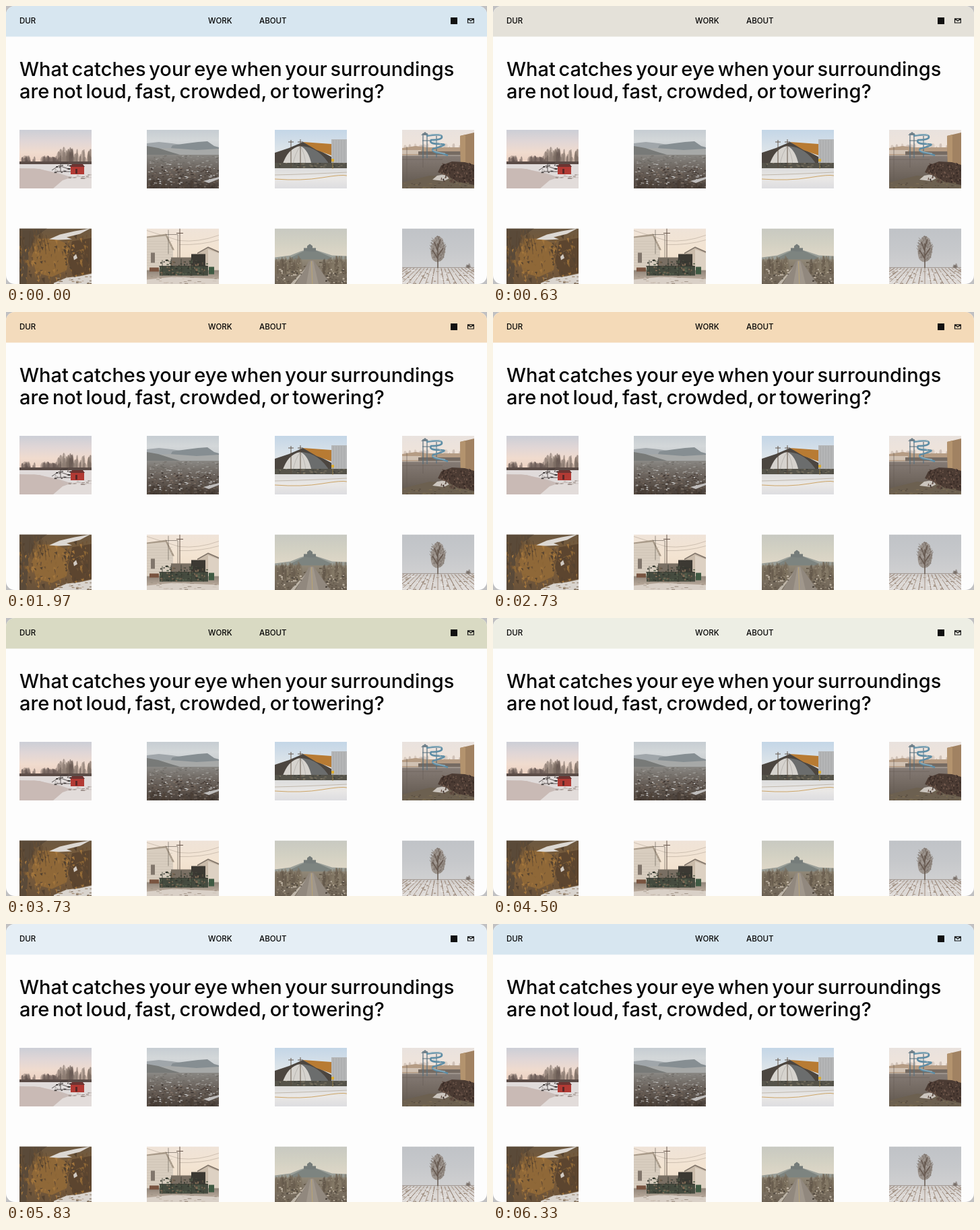
These frames come from a looping animation (714 by 413 pixels, 6360 ms). An HTML page:

```html
<!DOCTYPE html>
<html lang="en">
<head>
<meta charset="utf-8">
<title>Portfolio</title>
<style>
  html, body { margin: 0; width: 100%; height: 100%; overflow: hidden; background: #c0c0c2; }
  #stage { display: block; width: 714px; height: 413px; }
  text { font-family: Inter, "Open Sans", sans-serif; font-weight: 500; fill: #050505; }
  .nav { font-size: 11.5px; }
  .title { font-size: 29px; word-spacing: -3px; }
</style>
</head>
<body>
<svg id="stage" viewBox="0 0 714 413">
  <defs>
    <clipPath id="card"><rect width="714" height="413" rx="13"/></clipPath>
    <clipPath id="frame"><rect width="107" height="87"/></clipPath>
  </defs>
  <g clip-path="url(#card)">
    <rect width="714" height="413" fill="#fdfdfd"/>
    <rect id="bar" width="714" height="45.5" fill="#d7e6f0"/>
    <g class="nav">
      <text x="20" y="26">DUR</text>
      <text x="300" y="26">WORK</text>
      <text x="376" y="26">ABOUT</text>
    </g>
    <rect x="660" y="17" width="10" height="10" fill="#111"/>
    <path d="M685.5 18.8h8.8v6.2h-8.8zl4.4 3.4 4.4-3.4" fill="none" stroke="#111" stroke-width="1.2"/>
    <g class="title">
      <text x="20" y="103.5">What catches your eye when your surroundings</text>
      <text x="20" y="136.5">are not loud, fast, crowded, or towering?</text>
    </g>
    <g id="photos"></g>
  </g>
</svg>
<script>
const LOOP = 6360;
const NS = 'http://www.w3.org/2000/svg';

function add(parent, tag, attrs) {
  const el = document.createElementNS(NS, tag);
  for (const key in attrs) el.setAttribute(key, attrs[key]);
  return parent.appendChild(el);
}

function seeded(seed) {
  return () => {
    seed = (seed * 1664525 + 1013904223) >>> 0;
    return seed / 4294967296;
  };
}

// Drawing helpers for one 107 x 87 picture.
function pen(g, id) {
  const rnd = seeded(id * 977 + 13);
  const span = (a, b) => a + (b - a) * rnd();
  const pick = list => list[Math.floor(rnd() * list.length)];
  const shape = (fill, d) => add(g, 'path', { d, fill });
  const line = (stroke, width, d) => add(g, 'path', { d, stroke, 'stroke-width': width, fill: 'none' });
  const box = (fill, x, y, width, height) => add(g, 'rect', { x, y, width, height, fill });
  const fade = (colors, y, h) => {
    const name = `fade${id}-${y}`;
    const grad = add(g, 'linearGradient', { id: name, x1: 0, y1: 0, x2: 0, y2: 1 });
    colors.forEach((c, i) => add(grad, 'stop', { offset: i / (colors.length - 1), 'stop-color': c }));
    box(`url(#${name})`, 0, y, 107, h);
  };
  const specks = (n, x0, y0, x1, y1, w, h, colors) => {
    for (let i = 0; i < n; i++)
      box(pick(colors), span(x0, x1), span(y0, y1), span(w * .4, w), span(h * .4, h));
  };
  // Soft bare trees: translucent crowns standing on a base line.
  const trees = (n, x0, x1, base, low, high, colors) => {
    for (let i = 0; i < n; i++) {
      const x = span(x0, x1), tall = span(low, high);
      add(g, 'ellipse', { cx: x, cy: base - tall / 2, rx: span(1.5, 4), ry: tall / 2, fill: pick(colors), opacity: .4 });
      line(pick(colors), .5, `M${x} ${base}l${span(-1, 1)} ${-tall}`);
    }
  };
  return { span, shape, line, box, fade, specks, trees };
}

function river(p) {
  p.fade(['#ccced6', '#e0d6d6', '#f0dbce', '#ecd0c0'], 0, 50);
  p.fade(['#d6cbc8', '#c9bcb8', '#c2b5b1'], 49, 38);
  p.trees(34, 0, 60, 51, 6, 13, ['#6a5a55', '#7f6f68', '#574946']);
  p.trees(38, 58, 107, 53, 12, 28, ['#7b6b62', '#8d7d73', '#5f524c']);
  p.box('#5b4c47', 0, 47, 107, 4);
  p.shape('#e0dbda', 'M0 51H107V87H66L84 73L58 64L22 57L0 58z');
  p.shape('#c9bab5', 'M0 57L30 58L62 67L68 76L52 87H0z');
  p.shape('#e2dcda', 'M50 87L64 75L84 68H107V87z');
  p.specks(28, 50, 51, 76, 63, 4, 1.8, ['#2b2726', '#48423f', '#807773', '#e9e4e2']);
  p.line('#3a3433', .8, 'M48 60L59 53L75 59M61 62V50L72 49M52 62H77');
  p.box('#b23a34', 76, 55, 20, 11);
  p.shape('#6d3431', 'M75 55L78 51H94L97 55z');
  p.box('#5b2726', 83, 58, 3, 7);
  p.specks(20, 70, 66, 107, 72, 7, 1, ['#8e7f79', '#bbb1ad']);
}

function valley(p) {
  p.fade(['#c6cdd2', '#d3d7d9', '#c9cdcf'], 0, 30);
  p.shape('#a0a6aa', 'M0 20L18 18L37 20L57 23V38H0z');
  p.shape('#868e92', 'M38 23L60 20L76 18L90 17L100 24L107 26V38H30z');
  p.shape('#a7a9a8', 'M0 29L35 27L74 30L107 28V44H0z');
  p.shape('#787a78', 'M0 24L17 27L39 34L56 39L0 46z');
  p.fade(['#8a8884', '#716a64', '#5d544d', '#4a413b'], 37, 50);
  p.specks(130, 0, 38, 107, 56, 4, 1.2, ['#918e89', '#67645f', '#aaa8a4', '#79746e']);
  p.specks(200, 0, 54, 107, 87, 4, 2, ['#4b413b', '#665a50', '#3b332e', '#7e7065']);
  p.specks(60, 0, 50, 105, 82, 4, 1.4, ['#d3d4d4', '#b9b8b6']);
  p.shape('#c0bebd', 'M84 76L107 70V73L92 79z');
  p.trees(18, 0, 107, 87, 6, 14, ['#3b312a', '#51443a']);
}

function arena(p) {
  p.fade(['#c4d6e7', '#dbe3e9', '#f1e8df'], 0, 57);
  p.shape('#4c4640', 'M0 34L21 27L42 18L84 40V53H0z');
  p.shape('#b87b33', 'M42 18L84 21V38L62 30z');
  p.shape('#6b6d6d', 'M40 24Q66 26 82 53H45z');
  p.shape('#d6d3ce', 'M11 53Q19 27 38 24Q50 29 55 53z');
  p.line('#aeaba6', .7, 'M38 24Q45 36 46 53M38 24Q29 36 27 53');
  p.box('#b5b6b7', 84, 14, 23, 42);
  for (let x = 87; x < 107; x += 4) p.line('#a2a4a5', .7, `M${x} 15V55`);
  p.box('#55534a', 0, 49, 107, 8);
  p.specks(40, 0, 49, 105, 55, 4, 2, ['#6e695a', '#3d3f3a', '#837a67']);
  p.fade(['#dcdcdc', '#eae8e6', '#dddde0'], 57, 30);
  p.line('#c99c57', .9, 'M0 73Q40 76 70 71T107 68');
  p.line('#a89a88', .6, 'M0 67Q46 66 107 63');
  p.line('#5b4b3e', .9, 'M24 15V57M38 14V57M20 18H28M34 18H42');
  p.box('#dcae35', 84, 43, 4, 4);
  p.line('#a2884a', .8, 'M86 47V58');
}

function playground(p) {
  p.fade(['#e9e2de', '#f0e4da'], 0, 29);
  p.trees(14, 0, 86, 29, 4, 9, ['#b1a197', '#c6b5a8']);
  p.shape('#b59c84', 'M0 27L20 24L36 26H88V40H0z');
  p.box('#d0c1b2', 0, 30, 28, 6);
  p.box('#766b62', 24, 32, 63, 7);
  p.fade(['#857b75', '#736961', '#5f564d'], 38, 49);
  p.line('#c2b8af', .9, 'M0 38H87');
  p.line('#655d57', .6, 'M0 44H60M7 25V76M31 25V56');
  p.line('#58707e', 1.2, 'M31 5V42M37 5V42M51 9V41M30 16H44');
  p.shape('#70808a', 'M28 8L34 3L40 8z');
  p.line('#5e8da5', 2.6, 'M36 9Q58 5 59 10T43 15Q39 21 56 21T46 28Q42 33 60 35L68 38');
  p.line('#b0c8d1', .8, 'M38 8Q56 5 58 9M45 17Q57 18 57 22M45 30Q52 34 64 35');
  p.shape('#a18262', 'M86 9L107 4V58H87z');
  p.shape('#b3936e', 'M86 9L94 7V55H87z');
  p.shape('#6c6050', 'M0 78L41 68L107 72V87H0z');
  p.shape('#cbc5be', 'M45 74L52 68L63 66L70 72L62 76z');
  p.shape('#4b3b33', 'M53 63L58 53L74 47L93 48L107 52V82L82 77L66 68z');
  p.specks(130, 56, 49, 105, 77, 2.5, 3, ['#372a25', '#5b473d', '#6d564a']);
  p.specks(60, 0, 78, 107, 87, 5, 1.6, ['#7d6d54', '#574c3f', '#70634e']);
}

function cliff(p) {
  p.fade(['#6b5841', '#7b5c39', '#76593a', '#65503a'], 0, 87);
  p.shape('#5a4a39', 'M0 0H41L24 12L14 35L10 87H0z');
  p.shape('#8f6838', 'M27 15L53 15L76 25L70 62L48 72L25 66L18 42z');
  p.shape('#5c452f', 'M78 19L107 14V66L79 70L72 48z');
  const tones = ['#8c6636', '#544230', '#a3763d', '#6e5235'];
  for (let i = 0; i < 190; i++) {
    const x = p.span(-4, 104), y = p.span(8, 78);
    p.shape(tones[i % 4],
      `M${x} ${y}l${p.span(1, 5)} ${p.span(-2, 1)}l${p.span(-2, 1)} ${p.span(3, 9)}z`);
  }
  for (let i = 0; i < 30; i++)
    p.line(tones[i % 2 ? 1 : 3], .6, `M${p.span(0, 40)} ${p.span(0, 20)}l${p.span(-6, 6)} ${p.span(10, 26)}`);
  p.shape('#dcd8d3', 'M44 16L60 9L82 4L105 0L90 8L70 13L78 16L58 17z');
  p.shape('#d0cac3', 'M80 42L84 38L86 44L81 47z');
  p.shape('#d9d4ce', 'M51 81L70 73L89 71L107 67V87H50z');
  p.specks(30, 52, 71, 105, 83, 5, 1.6, ['#75624e', '#a99681']);
}

function yard(p) {
  p.fade(['#efe3d8', '#f3e4d2', '#eedcc7'], 0, 60);
  p.line('#a89a8c', .5, 'M48 18Q77 21 107 10M48 24Q80 25 107 17M0 3L48 18');
  p.shape('#d8cdbf', 'M0 14L29 10L39 32V65H0z');
  p.shape('#a89a89', 'M0 12L29 8L41 32H38L28 11L0 14z');
  for (let y = 19; y < 58; y += 4) p.line('#c6bcae', .5, `M0 ${y}H38`);
  p.box('#81766c', 6, 36, 6, 15);
  p.line('#65544a', 1, 'M49 0V48M44 7H54');
  p.line('#5d544c', .6, 'M28 9H46V46M32 2V38');
  p.shape('#cabbaa', 'M77 37L91 29L107 35V68H77z');
  p.shape('#ddd1c3', 'M91 31L107 37V68H91z');
  p.shape('#83776c', 'M75 36L91 27L107 34V36L91 29L75 38z');
  p.box('#796f63', 36, 43, 42, 15);
  p.box('#3c3933', 66, 38, 21, 20);
  p.fade(['#8f8478', '#b5a698', '#b7aa9d'], 62, 25);
  p.box('#454b3f', 19, 56, 72, 14);
  p.specks(110, 18, 46, 89, 68, 3.5, 2.5, ['#33372f', '#57614d', '#806b56', '#45463b']);
  p.line('#373a32', .8, 'M18 56H91M23 47V70M36 46V70M51 45V70M66 45V70M84 46V70');
  p.box('#3f5a43', 92, 57, 8, 11);
  p.box('#795440', 4, 58, 14, 6);
  p.shape('#d9d0c7', 'M0 76L39 72L107 75V87H0z');
  p.specks(24, 0, 71, 105, 82, 7, 1.2, ['#9a8c7f', '#c6b9ac']);
}

function avenue(p) {
  p.fade(['#c8c9c1', '#d3d1c3', '#e0d8c8'], 0, 45);
  p.shape('#9a9f99', 'M0 43L23 40L38 34L52 30L67 34L85 40L107 41V57H0z');
  p.shape('#7d8480', 'M22 44L42 34L62 33L84 43V54H22z');
  p.shape('#757c7a', 'M43 34V29H48V26L52 23L56 26V29H61V34z');
  p.fade(['#918878', '#7b7061', '#675c4f'], 46, 41);
  p.trees(60, 0, 38, 68, 8, 28, ['#756957', '#8b7f6d', '#5f5446']);
  p.trees(60, 70, 107, 68, 8, 28, ['#756957', '#8b7f6d', '#5f5446']);
  p.specks(90, 0, 48, 46, 86, 3, 2, ['#7f7362', '#5d5244', '#978b79']);
  p.specks(90, 64, 48, 107, 86, 3, 2, ['#7f7362', '#5d5244', '#978b79']);
  p.shape('#91887e', 'M51 48H58L86 87H28z');
  p.shape('#a0978c', 'M53 48H57L66 87H46z');
  p.line('#bda672', .9, 'M54.5 49L56 87');
  p.shape('#beb6aa', 'M45 60L48 56L26 87H19z');
  p.specks(20, 4, 60, 38, 75, 4, 2.5, ['#c0b5a5', '#4f473e']);
  p.specks(20, 75, 60, 103, 80, 4, 2.5, ['#c0b5a5', '#4f473e']);
}

function field(p) {
  p.fade(['#c0c3c7', '#c6c8cb', '#d0d0d1'], 0, 60);
  p.line('#a39a94', 1, 'M0 58H107');
  p.shape('#a09892', 'M53 11Q61 13 61 21Q66 30 63 39Q61 49 53 50Q44 49 43 40Q41 29 46 22Q46 13 53 11z');
  for (let i = 0; i < 240; i++) {
    const a = p.span(0, Math.PI * 2), r = Math.sqrt(p.span(0, 1));
    const x = 53 + Math.cos(a) * r * 11, y = 31 + Math.sin(a) * r * 19;
    p.line(i % 2 ? '#756a63' : '#8c817a', .6, `M${x} ${y}l${p.span(-3, 3)} ${p.span(-4, 0)}`);
  }
  p.line('#66584f', 1.5, 'M53 60V22M53 45L45 32M53 41L61 29M53 34L48 20M53 29L57 16');
  p.trees(5, 95, 101, 59, 4, 8, ['#756b64']);
  p.fade(['#cfcbc8', '#dedad7', '#dcd8d5'], 59, 28);
  for (let i = -14; i <= 14; i++)
    p.line(i % 2 ? '#8b7464' : '#a28e80', 1, `M${53 + i * 5} 59L${53 + i * 10} 87`);
  p.specks(130, 0, 61, 107, 86, 4, 1.4, ['#eae7e5', '#d9d5d2', '#93806f']);
}

const photos = document.getElementById('photos');
[river, valley, arena, playground, cliff, yard, avenue, field].forEach((draw, i) => {
  const x = [20, 209, 399, 588][i % 4], y = i < 4 ? 184 : 330.5;
  const place = add(photos, 'g', { transform: `translate(${x} ${y})` });
  draw(pen(add(place, 'g', { 'clip-path': 'url(#frame)' }), i + 1));
});

const tints = ['#d7e6f0', '#f1dcc2', '#f5dab8', '#d9dac3', '#fdfdfd', '#d7e6f0'];
document.getElementById('bar').animate(
  tints.map(fill => ({ fill, easing: 'ease-in-out' })),
  { duration: LOOP, iterations: Infinity }
);
</script>
</body>
</html>
```
